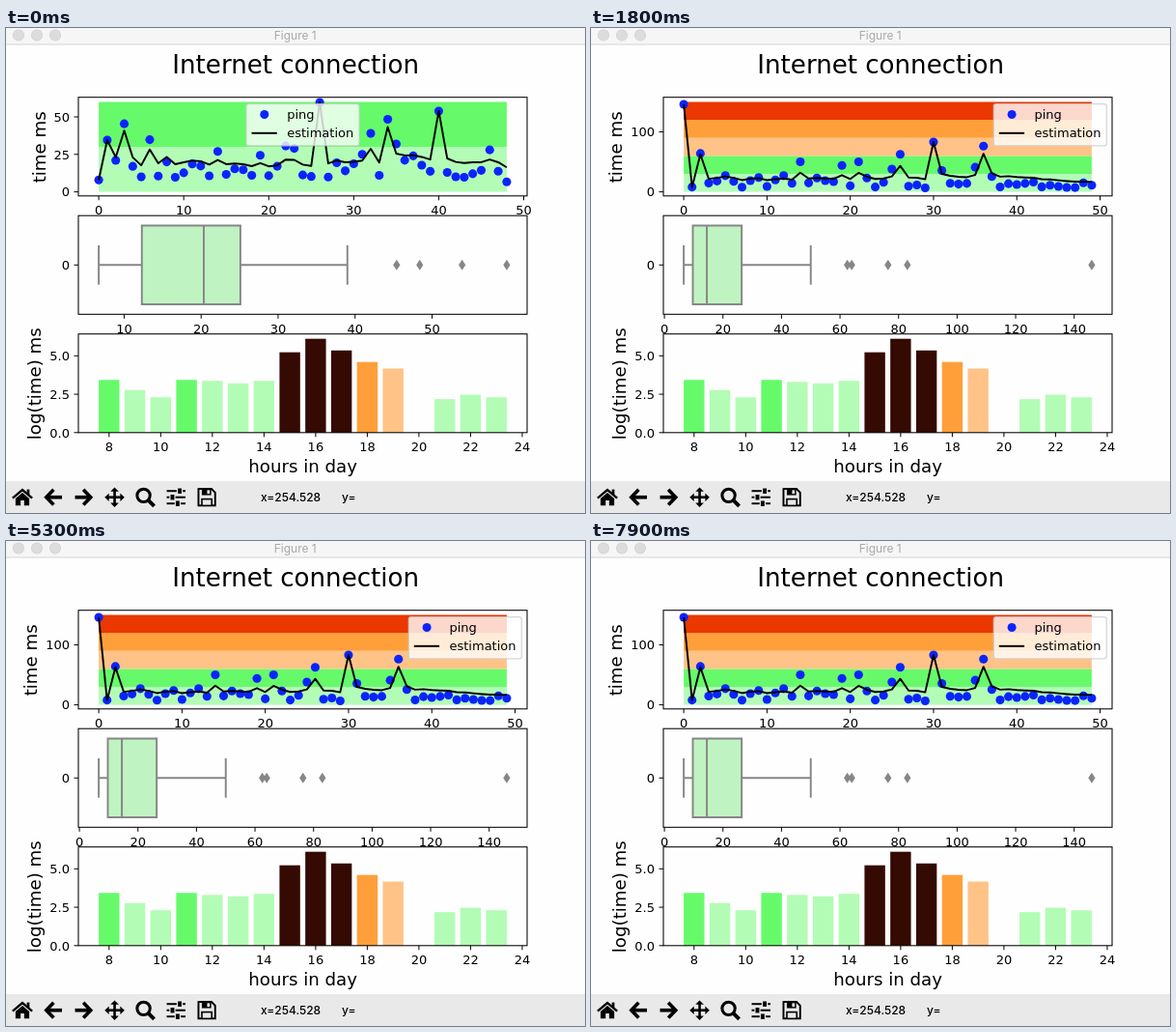
Animation of 600 by 502 pixels, one loop 8 s. Source, as an HTML page with a canvas:

```html
<!DOCTYPE html>
<html lang="en">
<head>
<meta charset="utf-8">
<title>Figure 1</title>
<style>
html, body { margin: 0; width: 100%; height: 100%; overflow: hidden; background: #fefefe; }
canvas { display: block; width: 600px; height: 502px; }
</style>
</head>
<body>
<canvas id="stage"></canvas>
<script>
const LOOP = 8000, SWITCH = 1800;
const BANDS = ['#b3fcb6', '#66fa6b', '#ffc387', '#ff9f39', '#eb3700', '#340a02'];
const STEP = 30; // ms per colour band
const PAPER = '#fefefe', BLUE = '#0b24fb', GRAY = '#868686', PANEL = '#e9e9e9';
const SANS = '"DejaVu Sans", Verdana, sans-serif', UI = 'Inter, Roboto, sans-serif';
const LEFT = 75, RIGHT = 540, HEIGHT = 102.1;
const X0 = 96.1, X1 = 518.9; // data edges inside the axes
const topOf = row => 71.7 + row * 122.5;

const canvas = document.getElementById('stage');
const ctx = canvas.getContext('2d');
const ratio = window.devicePixelRatio || 1;
canvas.width = 600 * ratio;
canvas.height = 502 * ratio;

const scale = (a, b, p, q) => v => p + (v - a) / (b - a) * (q - p);

function noise(i, seed) {
  const s = Math.sin(i * 12.9898 + seed * 78.233) * 43758.5453;
  return s - Math.floor(s);
}

// Quiet pings are seeded noise; the notable ones are given in ms.
function makePings(count, seed, base, range, peaks) {
  return Array.from({ length: count }, (_, i) => peaks[i] ?? base + range * noise(i, seed));
}

// Running level that leans towards a ping the further it strays.
function estimate(pings, spread) {
  let level = 25;
  return pings.map((p, i) => {
    if (i) level += 0.1 * (p - level);
    const d = p - level;
    return level + d * Math.min(1, (d / spread) ** 2 + 1 / i);
  });
}

const views = [
  {
    pings: makePings(49, 3, 9, 13, {
      0: 8, 1: 34.5, 2: 21, 3: 45.4, 5: 10, 6: 34.8, 14: 27, 19: 24.4, 22: 30.6, 23: 29, 26: 59.7,
      31: 25, 32: 39, 34: 48.4, 35: 32, 37: 24, 40: 53.9, 41: 13, 46: 28, 48: 6.7
    }),
    spread: 28, bands: 2, yStep: 25, yMax: 50, labelX: 40.7, legendX: 249,
    quartiles: [12.3, 20.35, 25.1], boxStep: 10, noon: 3.37
  },
  {
    pings: makePings(50, 7, 7, 14, {
      0: 146, 1: 8, 2: 64, 5: 27, 9: 24, 12: 27, 14: 50, 16: 23, 19: 44, 21: 50, 22: 23, 25: 38,
      26: 62.5, 29: 6.6, 30: 83, 31: 35.5, 35: 41, 36: 76.4, 37: 25.6, 49: 11
    }),
    spread: 54, bands: 5, yStep: 100, yMax: 100, labelX: 32.4, legendX: 417.3,
    quartiles: [9.7, 14.5, 26.4], boxStep: 20, noon: 3.3
  }
];
views.forEach(v => { v.line = estimate(v.pings, v.spread); });

// log(time) for each hour from 8 to 23
const hourly = [3.43, 2.77, 2.3, 3.43, 3.37, 3.21, 3.37, 5.23, 6.11, 5.35, 4.6, 4.17, 0, 2.18, 2.47, 2.3];

function rect(x, y, w, h, color) {
  ctx.fillStyle = color;
  ctx.fillRect(x, y, w, h);
}

function path(points, color, width) {
  ctx.beginPath();
  points.forEach(([x, y]) => ctx.lineTo(x, y));
  ctx.strokeStyle = color;
  ctx.lineWidth = width;
  ctx.stroke();
}

function shape(points, color) {
  ctx.beginPath();
  points.forEach(([x, y]) => ctx.lineTo(x, y));
  ctx.fillStyle = color;
  ctx.fill();
}

function dot(x, y, r, color) {
  ctx.beginPath();
  ctx.arc(x, y, r, 0, Math.PI * 2);
  ctx.fillStyle = color;
  ctx.fill();
}

function text(str, x, y, size, align = 'center', font = SANS, color = '#000', weight = 400) {
  ctx.font = `${weight} ${size}px ${font}`;
  ctx.textAlign = align;
  ctx.fillStyle = color;
  ctx.fillText(str, x, y);
}

function at(x, y, draw, turn = 0, size = 1) {
  ctx.save();
  ctx.translate(x, y);
  ctx.rotate(turn);
  ctx.scale(size, size);
  draw();
  ctx.restore();
}

function sideText(str, x, y) {
  at(x, y, () => text(str, 0, 0, 18.2), -Math.PI / 2);
}

function xTicks(row, from, to, step, toX) {
  const y = topOf(row) + HEIGHT;
  for (let n = from; n <= to; n += step) {
    path([[toX(n), y], [toX(n), y + 4.5]], '#000', 1);
    text(n, toX(n), y + 19.2, 13);
  }
}

function yTick(label, y) {
  path([[LEFT - 4.5, y], [LEFT, y]], '#000', 1);
  text(label, LEFT - 9, y + 4.8, 13, 'right');
}

function frame(row) {
  ctx.strokeStyle = '#000';
  ctx.lineWidth = 1.05;
  ctx.strokeRect(LEFT, topOf(row), RIGHT - LEFT, HEIGHT);
}

function clearRow(row) {
  rect(LEFT, topOf(row), RIGHT - LEFT, HEIGHT, PAPER);
}

function legend(x) {
  ctx.beginPath();
  ctx.roundRect(x, 78.6, 117, 43.2, 2.6);
  ctx.fillStyle = 'rgba(255,255,255,.8)';
  ctx.fill();
  ctx.strokeStyle = 'rgba(204,204,204,.8)';
  ctx.lineWidth = 1.3;
  ctx.stroke();
  dot(x + 18.8, 89.5, 4.5, BLUE);
  path([[x + 5.5, 108.8], [x + 31.8, 108.8]], '#000', 1.95);
  text('ping', x + 42.2, 94, 13, 'left');
  text('estimation', x + 42.2, 113.4, 13, 'left');
}

function pingPlot(v) {
  const toX = scale(0, v.pings.length - 1, X0, X1);
  const toY = scale(0, v.bands * STEP, 169.6, 76.5);
  for (let i = 0; i < v.bands; i++) {
    const y = toY((i + 1) * STEP);
    rect(X0, y, X1 - X0, toY(i * STEP) - y, BANDS[i]);
  }
  v.pings.forEach((p, i) => dot(toX(i), toY(p), 4.55, BLUE));
  ctx.lineJoin = 'round';
  path(v.line.map((p, i) => [toX(i), toY(p)]), '#000', 1.95);
  ctx.lineJoin = 'miter';
  frame(0);
  xTicks(0, 0, 50, 10, toX);
  for (let n = 0; n <= v.yMax; n += v.yStep) yTick(n, toY(n));
  sideText('time ms', v.labelX, 123.3);
  legend(v.legendX);
}

function boxPlot(v) {
  const min = Math.min(...v.pings), max = Math.max(...v.pings);
  const toX = scale(min, max, X0, X1);
  const [q1, mid, q3] = v.quartiles;
  const limit = q3 + 1.5 * (q3 - q1);
  const high = Math.max(...v.pings.filter(p => p <= limit));
  const top = topOf(1), y = top + HEIGHT / 2, half = HEIGHT * 0.4;
  const stroke = (...points) => path(points.map(([n, dy]) => [toX(n), y + dy]), GRAY, 1.95);

  clearRow(1);
  rect(toX(q1), y - half, toX(q3) - toX(q1), half * 2, '#c0f3c2');
  stroke([min, 0], [q1, 0]);
  stroke([q3, 0], [high, 0]);
  [min, high].forEach(n => stroke([n, -half / 2], [n, half / 2]));
  stroke([q1, -half], [q3, -half], [q3, half], [q1, half], [q1, -half - 1]);
  stroke([mid, -half], [mid, half]);
  v.pings.filter(p => p > limit).forEach(p => {
    const x = toX(p);
    shape([[x, y - 5.5], [x + 3.6, y], [x, y + 5.5], [x - 3.6, y]], GRAY);
  });
  frame(1);
  xTicks(1, min > 0 && v.boxStep === 10 ? 10 : 0, max, v.boxStep, toX);
  yTick('0', y);
}

function barPlot(v) {
  const toX = scale(7.6, 23.4, X0, X1);
  const floor = topOf(2) + HEIGHT;
  const toY = n => floor - n * 15.9;
  clearRow(2);
  hourly.forEach((value, i) => {
    const hour = i + 8;
    const n = hour === 12 ? v.noon : value;
    const color = BANDS[Math.min(5, Math.floor(Math.exp(n) / STEP))];
    rect(toX(hour - 0.4), toY(n), toX(0.8) - toX(0), floor - toY(n), color);
  });
  frame(2);
  xTicks(2, 8, 24, 2, toX);
  [0, 2.5, 5].forEach(n => yTick(n.toFixed(1), toY(n)));
  sideText('log(time) ms', 36.2, 368.2);
  text('hours in day', 307.6, 460, 18.2);
}

function titleBar() {
  rect(0, 0, 600, 17, '#f6f6f6');
  rect(0, 16.5, 600, 1, '#d6d6d6');
  [13, 32, 51].forEach(x => {
    dot(x, 7.5, 6, '#d0d0d0');
    dot(x, 7.5, 5.4, '#dcdcdc');
  });
  text('Figure 1', 299.7, 12, 12, 'center', UI, '#a9a9a9');
}

function home() {
  path([[-9.4, 0.8], [0, -7], [9.4, 0.8]], '#000', 2.2);
  rect(4.3, -7.5, 2.5, 5, '#000');
  shape([[-6.6, 1.2], [0, -4.3], [6.6, 1.2], [6.6, 8], [1.7, 8], [1.7, 3], [-1.7, 3], [-1.7, 8], [-6.6, 8]], '#000');
}

function arrow() {
  path([[0.5, -7.3], [-6.5, 0], [0.5, 7.3]], '#000', 3.4);
  path([[-6, 0], [8.5, 0]], '#000', 3.4);
}

function move() {
  for (let i = 0; i < 4; i++) {
    at(0, 0, () => {
      path([[0, 0], [0, -7]], '#000', 2.4);
      shape([[0, -9.5], [4, -5.4], [-4, -5.4]], '#000');
    }, i * Math.PI / 2);
  }
}

function lens() {
  dot(-1.7, -1.7, 7.6, '#000');
  dot(-1.7, -1.7, 4.8, PANEL);
  path([[2.5, 2.5], [8.5, 8.5]], '#000', 3.6);
}

function sliders() {
  [[-6, 3.5], [0, -3.5], [6, 1.5]].forEach(([y, knob]) => {
    rect(-9, y - 0.9, 18, 1.8, '#000');
    rect(knob - 2.9, y - 2.9, 5.8, 5.8, PANEL);
    rect(knob - 1.8, y - 2.5, 3.6, 5, '#000');
  });
}

function disk() {
  path([[-8, -8], [4.5, -8], [8, -4.5], [8, 8], [-8, 8], [-8, -8.8]], '#000', 1.8);
  rect(-4.8, -8, 9, 6, '#000');
  rect(0.3, -6.8, 2.5, 3.5, PANEL);
  rect(-5.5, 1, 11, 7, '#000');
  rect(-4, 2.5, 8, 4.8, PANEL);
}

function toolbar() {
  rect(0, 469, 600, 33, PANEL);
  const turned = () => at(0, 0, arrow, Math.PI);
  [home, arrow, turned, move, lens, sliders, disk].forEach((icon, i) => {
    at(17 + i * 31.85, 485.7, icon, 0, 1.08);
  });
  text('x=254.528', 264, 490, 12, 'left', UI, '#000', 500);
  text('y=', 348, 490, 12, 'left', UI, '#000', 500);
}

function draw(time) {
  const view = views[time % LOOP < SWITCH ? 0 : 1];
  ctx.setTransform(ratio, 0, 0, ratio, 0, 0);
  rect(0, 0, 600, 502, PAPER);
  text('Internet connection', 300.2, 46.5, 26.1);
  pingPlot(view);
  boxPlot(view);
  barPlot(view);
  titleBar();
  toolbar();
}

const start = performance.now();
function tick() {
  draw(performance.now() - start);
  requestAnimationFrame(tick);
}
tick();
</script>
</body>
</html>
```
